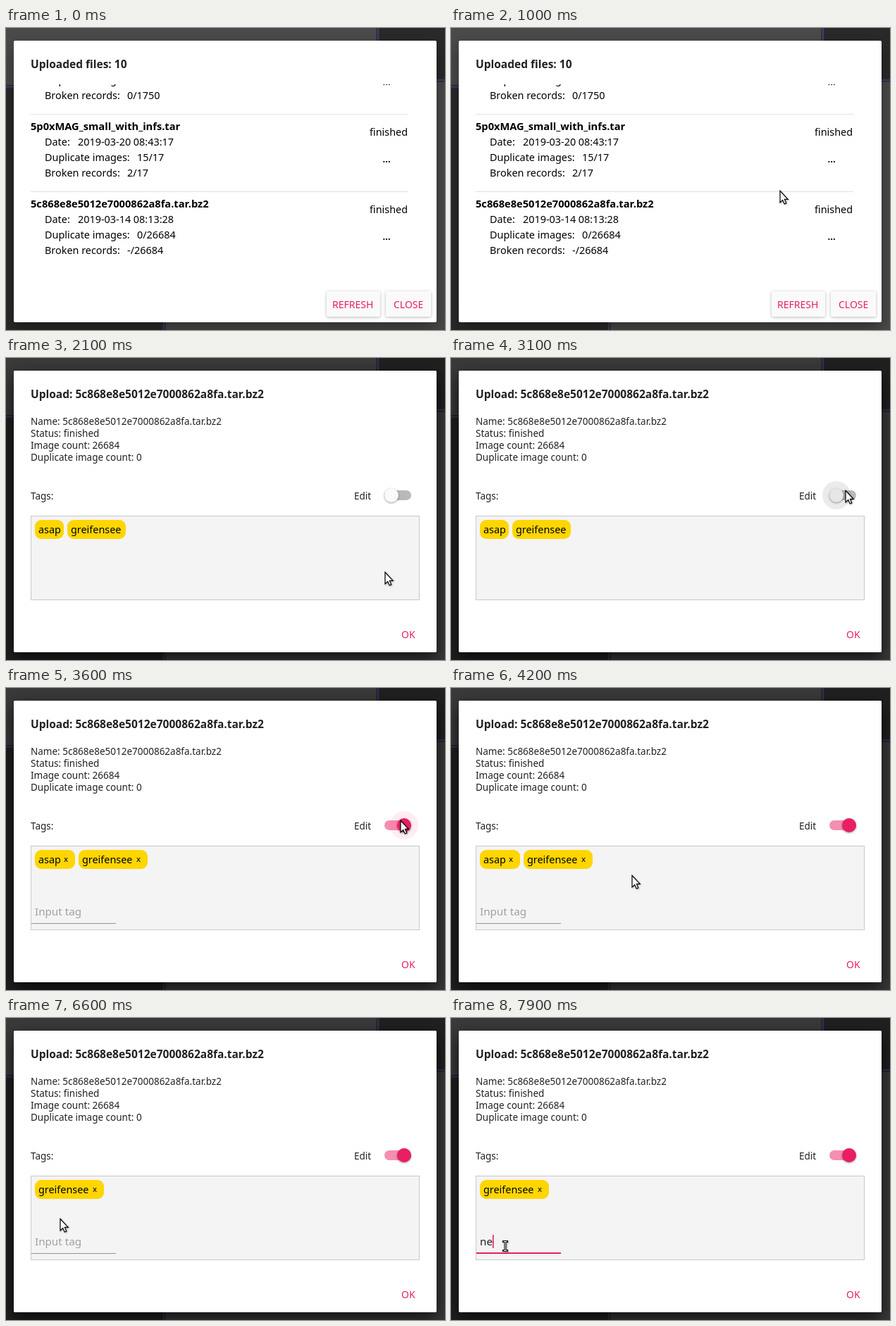
Write an HTML page that moves like this. It is 623 px wide and 429 px high and loops after 8 s.

```html
<!DOCTYPE html>
<html lang="en">
<head>
<meta charset="utf-8">
<title>Upload tags</title>
<style>
  html, body { margin: 0; width: 100%; height: 100%; overflow: hidden; background: #2a2a2a; }
  svg { display: block; font-family: "Noto Sans", "Open Sans", sans-serif; }
  .dialog { fill: #fff; filter: drop-shadow(0 9px 12px rgba(0, 0, 0, .4)); }
  .title { font-size: 15.5px; font-weight: 700; fill: #212121; }
  .name { font-size: 14.65px; font-weight: 700; }
  .item { font-size: 14.4px; }
  .dots { font-size: 13px; font-weight: 700; }
  .info { font-size: 13.5px; fill: #212121; }
  .button { font-size: 14px; font-weight: 500; fill: #e91e63; }
  .raised { fill: #fafafa; filter: drop-shadow(0 1.5px 2px rgba(0, 0, 0, .28)); }
  .knob { filter: drop-shadow(0 1px 1.5px rgba(0, 0, 0, .4)); }
  .remove { font-size: 11.5px; }
  .input { font-size: 15.2px; fill: #212121; }
  .placeholder { font-size: 15.2px; fill: #a0a0a0; }
  .pointer { filter: drop-shadow(1px 1px 1px rgba(0, 0, 0, .3)); }
</style>
</head>
<body>
<svg id="stage" width="623" height="429" viewBox="0 0 623 429"></svg>
<script>
const LOOP = 8000, STEP = 100;
const PINK = '#e91e63';
const FILE = '5c868e8e5012e7000862a8fa.tar.bz2';

// Times of the user's actions
const OPEN = 1900, TOGGLE = 3300, REMOVE = 5800, HOVER_INPUT = 6700, FOCUS = 7100, CARET_OFF = 7700;
const TYPING = [7800, 7900], TYPED = 'ne';

// Pointer path: time, x, y
const PATH = [
  [500, 260, 11], [800, 378, 130], [1100, 510, 280], [1200, 532, 304], [1300, 524, 299],
  [1400, 533, 303], [1500, 536, 304], [1600, 536, 304], [1700, 537, 303], [2200, 537, 303],
  [2400, 538, 270], [2600, 538, 270], [2800, 545, 242], [3000, 561, 196], [3100, 559, 187],
  [3600, 559, 187], [3800, 510, 220], [4100, 307, 269], [4200, 256, 265], [4500, 118, 247],
  [4700, 83, 243], [4800, 83, 243], [4900, 82, 241], [6300, 82, 241], [6600, 76, 284], [6800, 77, 324]
];

const clamp = v => Math.max(0, Math.min(1, v));
const mix = (a, b, k) => a + (b - a) * k;

const text = (x, y, kind, s) => `<text x="${x}" y="${y}" class="${kind}">${s}</text>`;
const rect = (x, y, w, h, attrs) => `<rect x="${x}" y="${y}" width="${w}" height="${h}" ${attrs}/>`;
const circle = (x, y, r, attrs) => `<circle cx="${x}" cy="${y}" r="${r}" ${attrs}/>`;
const dialog = () => rect(11, 18, 600, 400, 'rx="2" class="dialog"');

function pointerAt(t) {
  if (t < PATH[0][0]) return null;
  const i = PATH.findIndex(p => p[0] > t);
  if (i < 0) return PATH.at(-1).slice(1);
  const [t0, x0, y0] = PATH[i - 1], [t1, x1, y1] = PATH[i];
  const k = (t - t0) / (t1 - t0);
  return [mix(x0, x1, k), mix(y0, y1, k)];
}

const within = (p, x, y, r) => p && Math.hypot(p[0] - x, p[1] - y) < r;

function page() {
  const panel = (x, y, w, h) =>
    rect(x, y, w, h, 'fill="#2a2a2a" stroke="#2d2a4a" stroke-width="5"') +
    rect(x, y, w, h, 'fill="none" stroke="#505058" stroke-width="1.4"');
  return rect(0, 0, 623, 429, 'fill="#4b4b4b"') +
    panel(528, -5, 110, 79) + panel(-5, 83.5, 229, 360);
}

function listItem(y, name, date, duplicates, broken) {
  const row = (n, label, x, value) =>
    text(55, y + 22 * n, 'item', label) + text(x, y + 22 * n, 'item', value);
  return rect(35, y - 23, 536, 1, 'fill="#e0e0e0"') + text(35, y, 'name', name) +
    row(1, 'Date:', 102, date) + row(2, 'Duplicate images:', 186, duplicates) +
    row(3, 'Broken records:', 172, broken) +
    text(516, y + 8, 'item', 'finished') + text(534.5, y + 46, 'dots', '...');
}

function listDialog(pointer) {
  return dialog() + text(35, 57, 'title', 'Uploaded files: 10') +
    (within(pointer, 540, 296, 17) ? circle(540, 296, 17, 'fill="#ececec"') : '') +
    '<clipPath id="list"><path d="M30 80H600V360H30Z"/></clipPath><g clip-path="url(#list)">' +
    listItem(35, '', '', '0/1750', '0/1750') +
    listItem(145, '5p0xMAG_small_with_infs.tar', '2019-03-20 08:43:17', '15/17', '2/17') +
    listItem(255, FILE, '2019-03-14 08:13:28', '0/26684', '-/26684') + '</g>' +
    rect(455, 374, 76, 36, 'rx="2" class="raised"') + text(463, 398, 'button', 'REFRESH') +
    rect(539, 374, 64, 36, 'rx="2" class="raised"') + text(550, 398, 'button', 'CLOSE');
}

function editSwitch(t, pointer) {
  const on = t >= TOGGLE, x = on ? mix(556, 565, clamp((t - TOGGLE) / STEP)) : 547;
  const hover = within(pointer, x, 195, 20) ? .08 : 0;
  const ripple = on ? .3 * clamp(1 - (t - TOGGLE) / 400) : 0;
  return rect(537, 188, 38, 14, `rx="7" fill="${on ? '#f48fb1' : '#b9b9b9'}"`) +
    circle(x, 195, 10, `class="knob" fill="${on ? PINK : '#fafafa'}"`) +
    circle(x, 195, 20, `fill="${on ? PINK : '#000'}" opacity="${Math.max(hover, ripple)}"`);
}

function chips(t) {
  const editing = t >= TOGGLE;
  let x = 41, out = '';
  for (const [label, width, editWidth] of [['asap', 41, 57], ['greifensee', 83, 98]]) {
    if (label === 'asap' && t >= REMOVE) continue;
    const w = editing ? editWidth : width;
    out += rect(x, 230, w, 27, 'rx="9" fill="#ffd600"') + text(x + 5, 249, 'item', label) +
      (editing ? text(x + w - 16, 247, 'remove', 'x') : '');
    x += w + 5;
  }
  return out;
}

function tagInput(t) {
  const focused = t >= FOCUS;
  const typed = TYPED.slice(0, TYPING.filter(at => t >= at).length);
  const caret = focused && (t < CARET_OFF || typed);
  const line = focused ? PINK : t >= HOVER_INPUT ? '#212121' : '#949494';
  const weight = t >= HOVER_INPUT ? 2 : 1;
  return (typed ? text(41, 323, 'input', typed) : text(41, 323, 'placeholder', 'Input tag')) +
    rect(36, 335 - weight, 120, weight, `fill="${line}"`) +
    (caret ? rect(41 + 9 * typed.length, 308, 1.6, 19, `fill="${PINK}"`) : '');
}

function uploadDialog(t, pointer) {
  const lines = [`Name: ${FILE}`, 'Status: finished', 'Image count: 26684', 'Duplicate image count: 0'];
  return rect(0, 0, 623, 429, 'opacity=".22"') + dialog() +
    text(35, 57, 'title', `Upload: ${FILE}`) +
    lines.map((s, i) => text(35, 95 + 17 * i, 'info', s)).join('') +
    text(35, 201, 'info', 'Tags:') + text(494, 201, 'info', 'Edit') + editSwitch(t, pointer) +
    rect(35.5, 224.5, 551, 119, 'fill="#f4f4f4" stroke="#c9c9c9"') + chips(t) +
    (t >= TOGGLE ? tagInput(t) : '') + text(561, 398, 'button', 'OK');
}

function pointerShape(t, [x, y]) {
  const beam = 'M-2.5-6.5H2.5M0-6.5V6.5M-2.5 6.5H2.5';
  const shape = t >= HOVER_INPUT + STEP
    ? `<path d="${beam}" fill="none" stroke="#000" stroke-width="3" stroke-linecap="square"/>
       <path d="${beam}" fill="none" stroke="#fff" stroke-width="1"/>`
    : `<path d="M1 1.3V18L4.7 14.6L7.2 20L9.8 18.9L7.4 13.4H12.2Z" fill="#fff" stroke="#000" stroke-width="1.2"/>`;
  return `<g class="pointer" transform="translate(${Math.round(x)} ${Math.round(y)})">${shape}</g>`;
}

function draw(t) {
  const pointer = pointerAt(t), opened = clamp((t - OPEN) / 200);
  return page() + listDialog(pointer) +
    (opened ? `<g opacity="${opened}">${uploadDialog(t, pointer)}</g>` : '') +
    (pointer ? pointerShape(t, pointer) : '');
}

const stage = document.getElementById('stage');
let start, shown = -1;
function tick(now) {
  start ??= now;
  const t = Math.floor((now - start) % LOOP / STEP) * STEP;
  if (t !== shown) stage.innerHTML = draw(shown = t);
  requestAnimationFrame(tick);
}
requestAnimationFrame(tick);
</script>
</body>
</html>
```
